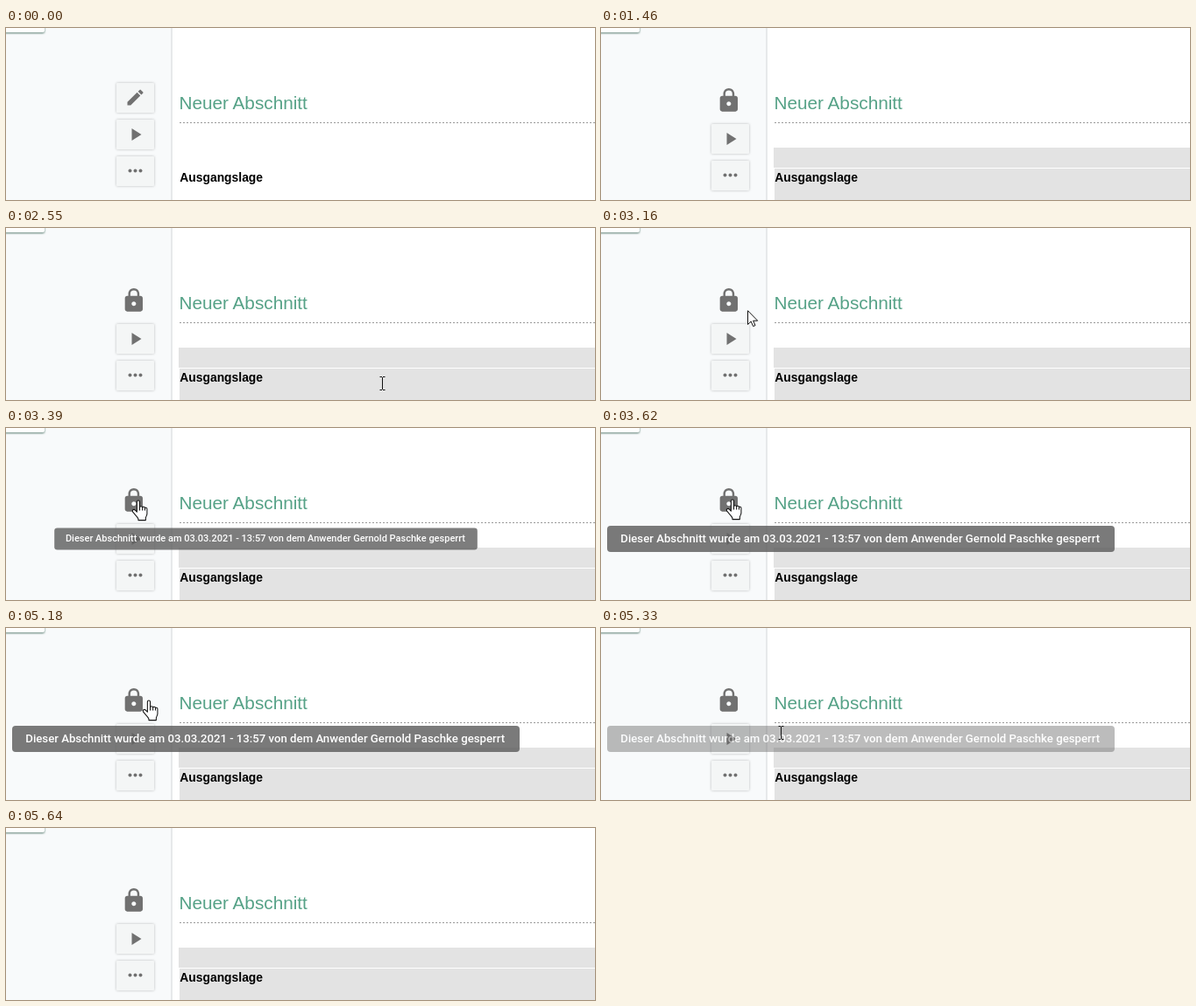
An HTML page for the animation above (6570 ms loop, 672 px wide and 197 px high).

```html
<!DOCTYPE html>
<html lang="de">
<head>
<meta charset="utf-8">
<title>Gesperrter Abschnitt</title>
<style>
  html, body { margin: 0; width: 100%; height: 100%; overflow: hidden; background: #fff; }
  svg { display: block; width: 100vw; height: 100vh; }
  text { font-family: "Liberation Sans", Arial, sans-serif; }
  .tile { fill: #f4f6f6; filter: drop-shadow(0 0 1.5px rgba(0, 0, 0, .25)); }
  .icon { fill: #717171; }
  .save { fill: #fff; filter: drop-shadow(0 1px 1px rgba(40, 85, 68, .75)); }
  #tip text { font: 500 13.2px Roboto, sans-serif; fill: #fff; }
</style>
</head>
<body>
<svg viewBox="0 0 672 197">
  <rect width="672" height="197" fill="#fff"/>
  <rect width="188" height="197" fill="#f8fafb"/>
  <rect x="188" width="2" height="197" fill="#e7e9ea"/>
  <rect class="save" x="-10" y="-20" width="54" height="25" rx="2"/>

  <g id="edit">
    <rect class="tile" x="126" y="63" width="43" height="34" rx="1"/>
    <path class="icon" transform="translate(135.5 67.6)" d="M3 17.25V21h3.75L17.81 9.94l-3.75-3.75zM20.71 7.04a1 1 0 0 0 0-1.41l-2.34-2.34a1 1 0 0 0-1.41 0l-1.83 1.83 3.75 3.75z"/>
  </g>
  <g id="lower">
    <rect class="tile" x="126" y="105" width="43" height="34" rx="1"/>
    <path class="icon" d="M143.5 115v14l11-7z"/>
    <rect class="tile" x="126" y="147" width="43" height="34" rx="1"/>
    <g class="icon">
      <circle cx="141.5" cy="163.5" r="2"/>
      <circle cx="147.5" cy="163.5" r="2"/>
      <circle cx="153.5" cy="163.5" r="2"/>
    </g>
  </g>
  <g id="locked">
    <path class="icon" transform="translate(130.6 67.7) scale(1.27)" d="M18 8h-1V6c0-2.76-2.24-5-5-5S7 3.24 7 6v2H6c-1.1 0-2 .9-2 2v10c0 1.1.9 2 2 2h12c1.1 0 2-.9 2-2V10c0-1.1-.9-2-2-2zm-6 9c-1.1 0-2-.9-2-2s.9-2 2-2 2 .9 2 2-.9 2-2 2zm3.1-9H8.9V6a3.1 3.1 0 0 1 6.2 0z"/>
    <path d="M197 137H672V160H197zM198 161H672V197H198z" fill="#e3e3e3"/>
  </g>

  <text x="197.4" y="93" font-size="20.75" fill="#56a287">Neuer Abschnitt</text>
  <path d="M198 108.5H672" stroke="#999" stroke-dasharray="2 2"/>
  <text x="198.3" y="176" font-size="13.87" font-weight="700">Ausgangslage</text>

  <g id="tip">
    <rect x="7" y="112" width="579" height="30" rx="4" fill="#616161" fill-opacity=".84"/>
    <text x="22.3" y="130.7">Dieser Abschnitt wurde am 03.03.2021 - 13:57 von dem Anwender Gernold Paschke gesperrt</text>
  </g>

  <!-- pointer shapes share their hot spot at 0,0 -->
  <g id="pointer">
    <path id="beam" d="M-3-7.5H-.5M.5-7.5H3M-3 7.5H-.5M.5 7.5H3M0-7V7" fill="none" stroke="#111"/>
    <path id="arrow" d="M.5.7V16.5L4.2 13 6.6 18.6 9 17.6 6.6 12.2H11.7z" fill="#fff" stroke="#111"/>
    <path id="hand" transform="translate(-7.4 -.5) scale(1.05)" d="M5.5 1.8C5.5.1 8.5.1 8.5 1.8V8c.2-1.6 2.8-1.4 3 .2.3-1.2 2.6-1 2.7.6.4-.9 2.3-.6 2.3 1V15c0 2-1.5 3-1.5 5v2H7v-1.5C6 18 3 15.5 1 13-.3 11 2 9.6 3.6 11l1.9 2zM8.5 8v3.5M11.5 8.2v3.3M14.2 8.8v2.7" fill="#fff" stroke="#111" stroke-linejoin="round"/>
  </g>
</svg>
<script>
const LOOP = 6570, LOCK = 1460, ENTER = 2550, HOVER = 3240, REST = 3620, LEAVE = 5180, GONE = 5640;
const STEP = 76.25;
const el = id => document.getElementById(id);
const show = (id, on) => { el(id).style.display = on ? "" : "none"; };
const mix = (a, b, p) => a + (b - a) * p;
const smooth = p => p * p * (3 - 2 * p);
const stepsSince = (t, start) => Math.floor((t - start + 3) / STEP);

function at(x, y) {
  return { x: Math.round(x * 2) / 2, y: Math.round(y), shape: x < 190 ? "arrow" : "beam" };
}

function pointerAt(t) {
  if (t < ENTER || t >= GONE) return null;
  if (t < HOVER) {
    const p = smooth(Math.min(1, stepsSince(t, ENTER) / 8));
    return at(mix(429.5, 167, p), mix(178, 93.5, p));
  }
  if (t < REST) return { x: 151, y: 83, shape: "hand" };
  if (t < LEAVE) return { x: 150, y: 82, shape: "hand" };
  const k = stepsSince(t, LEAVE);
  if (k === 0) return { x: 163, y: 83, shape: "hand" };
  const p = Math.min(1, k / 5);
  return at(mix(163, 429.5, p * p), mix(83, 176, p));
}

// The tooltip pops up with a decelerating scale and fades out in place.
function tipAt(t) {
  if (t < HOVER || t >= GONE) return { scale: 1, alpha: 0 };
  if (t < LEAVE) {
    const k = Math.min(5, stepsSince(t, HOVER));
    return { scale: 1 - Math.pow(1 - k / 5, 3.51), alpha: Math.min(1, k * .49) };
  }
  const k = stepsSince(t, LEAVE);
  return { scale: 1, alpha: k < 2 ? 1 : k === 2 ? .5 : 0 };
}

function draw(t) {
  const locked = t >= LOCK;
  show("edit", !locked);
  show("locked", locked);
  el("lower").setAttribute("transform", `translate(0 ${locked ? 5 : 0})`);

  const tip = tipAt(t);
  show("tip", tip.alpha > 0);
  el("tip").setAttribute("opacity", tip.alpha);
  el("tip").setAttribute("transform", `translate(296.5 127) scale(${tip.scale}) translate(-296.5 -127)`);

  const p = pointerAt(t);
  show("pointer", p);
  if (p) {
    el("pointer").setAttribute("transform", `translate(${p.x} ${p.y})`);
    for (const s of ["beam", "arrow", "hand"]) show(s, s === p.shape);
  }
}

const begin = performance.now();
function tick() {
  draw((performance.now() - begin) % LOOP);
  requestAnimationFrame(tick);
}
tick();
</script>
</body>
</html>
```
